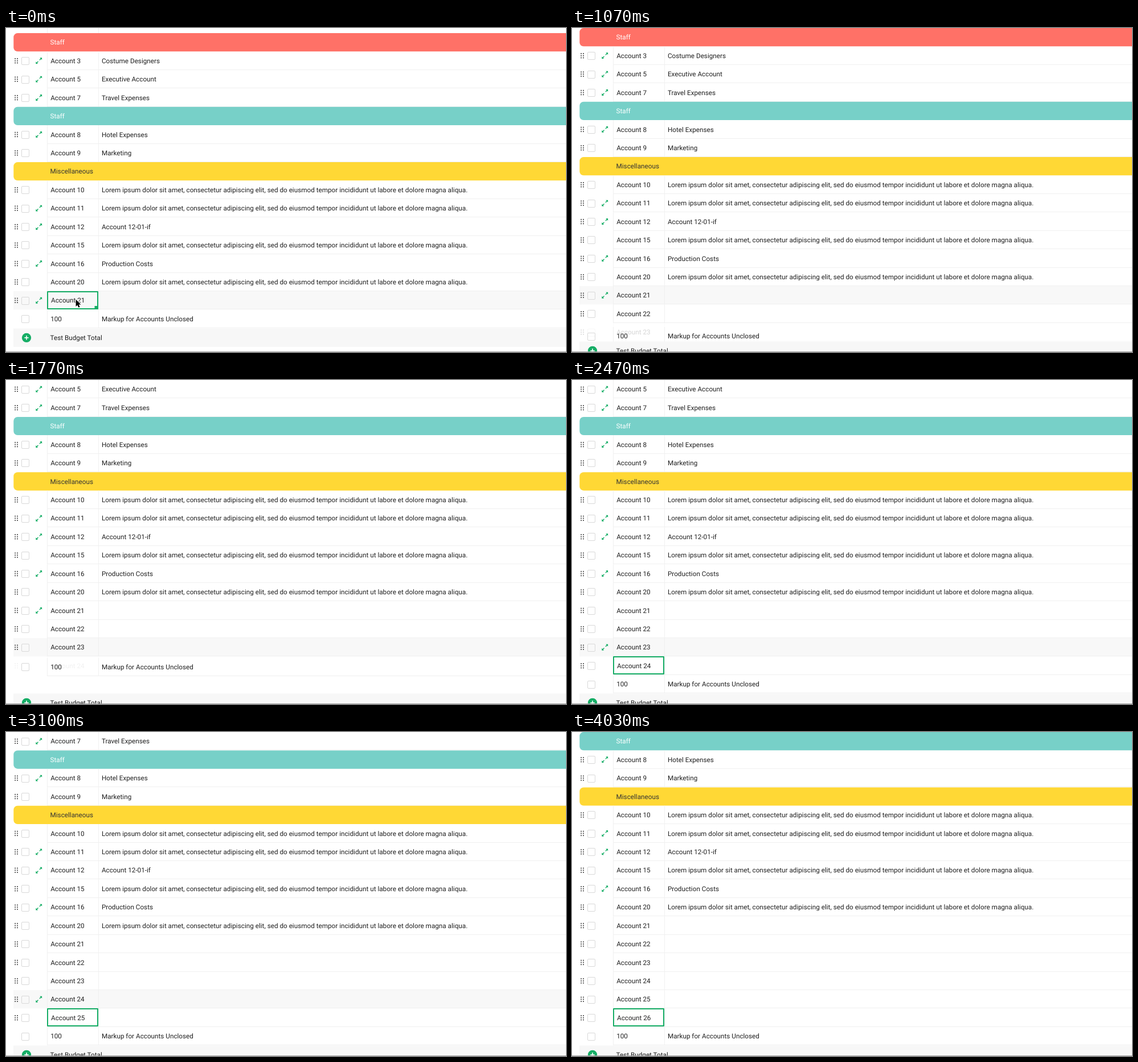
These frames come from a looping animation (983 px wide and 570 px high, 4570 ms). An HTML page with a canvas:

```html
<!DOCTYPE html>
<html lang="en">
<head>
<meta charset="utf-8">
<title>Budget table</title>
<style>
html, body { margin: 0; width: 100%; height: 100%; overflow: hidden; background: #fff; }
canvas { display: block; }
</style>
</head>
<body>
<canvas id="stage" width="983" height="570"></canvas>
<script>
const ctx = document.getElementById('stage').getContext('2d');
const W = 983, H = 570, LOOP = 4570, ROW = 32.43;
const GREEN = '#15ad65', LINE = '#f0f0f0', HOVER = '#f8f8f8', INK = '#212121';
const LOREM = 'Lorem ipsum dolor sit amet, consectetur adipiscing elit, sed do eiusmod tempor incididunt ut labore et dolore magna aliqua.';

const group = (title, fill, ink) => ({ title, fill, ink });
const account = (id, note = '', expands = false) => ({ label: 'Account ' + id, note, expands });
const ROWS = [
  group('Staff', '#ff7167', '#fff'),
  account(3, 'Costume Designers', true),
  account(5, 'Executive Account', true),
  account(7, 'Travel Expenses', true),
  group('Staff', '#77d0c8', '#fff'),
  account(8, 'Hotel Expenses', true),
  account(9, 'Marketing'),
  group('Miscellaneous', '#ffd835', '#333'),
  account(10, LOREM),
  account(11, LOREM, true),
  account(12, 'Account 12-01-if', true),
  account(15, LOREM),
  account(16, 'Production Costs', true),
  account(20, LOREM)
];
for (let id = 21; id <= 26; id++) ROWS.push(account(id));
const LAST = 14; // index of the last account before any insertion

// Per insertion count: when it starts, scroll position, hovered row
const STARTS = [-1000, 270, 1005, 1740, 2495, 3270];
const TOPS = [9, 9, 0, -2 * ROW, -3 * ROW, -4 * ROW];
const HOVERS = [14, 14, 14, 16, 17, -1];
const SLIDE = 400, FADE = 200, HOVER_LAG = 20, ICON_LAG = 30, SELECT_LAG = 330;

const clamp = v => Math.max(0, Math.min(1, v));

// CSS "ease": cubic-bezier(.25, .1, .25, 1)
function ease(x) {
  let lo = 0, hi = 1;
  for (let i = 0; i < 20; i++) {
    const t = (lo + hi) / 2;
    if (0.75 * t - 0.75 * t * t + t ** 3 < x) lo = t; else hi = t;
  }
  const t = hi, u = 1 - t;
  return 0.3 * u * u * t + 3 * u * t * t + t ** 3;
}

function rect(x, y, w, h, fill) {
  ctx.fillStyle = fill;
  ctx.fillRect(x, y, w, h);
}

function text(s, x, middle, fill = INK) {
  ctx.fillStyle = fill;
  ctx.fillText(s, x, middle + 4.2);
}

function path(points, close) {
  ctx.beginPath();
  points.forEach(([x, y]) => ctx.lineTo(x, y));
  if (close) ctx.closePath();
}

function drawHandle(y) {
  for (const x of [16.1, 20])
    for (const dy of [-3.7, 0, 3.7]) rect(x - 0.9, y + dy - 0.9, 1.9, 1.9, '#565656');
}

function drawCheckbox(y) {
  ctx.strokeStyle = '#d9d9d9';
  ctx.lineWidth = 1;
  ctx.beginPath();
  ctx.roundRect(27.5, Math.round(y - 6.5) + 0.5, 13, 13, 1.5);
  ctx.stroke();
}

function drawExpand(y, alpha) {
  if (alpha <= 0) return;
  ctx.save();
  ctx.globalAlpha *= alpha;
  ctx.translate(57.7, y);
  ctx.fillStyle = ctx.strokeStyle = GREEN;
  ctx.lineWidth = 1.4;
  for (let i = 0; i < 2; i++) {
    path([[1.2, -1.2], [4.3, -4.3]]);
    ctx.stroke();
    path([[1.6, -5.4], [5.4, -5.4], [5.4, -1.6]], true);
    ctx.fill();
    ctx.rotate(Math.PI);
  }
  ctx.restore();
}

function drawCellLines(y) {
  rect(72, y, 1, ROW, LINE);
  rect(162, y, 1, ROW, LINE);
  rect(72, Math.round(y + ROW) - 1, W, 1, LINE);
}

function drawGroup(row, y) {
  ctx.fillStyle = row.fill;
  ctx.beginPath();
  ctx.roundRect(13.3, y + 0.1, W, ROW - 0.3, 7);
  ctx.fill();
  text(row.title, 77.5, y + ROW / 2, row.ink);
}

function drawAccount(row, y, hovered, icon, selected) {
  const middle = y + ROW / 2;
  if (hovered) rect(13, y, W, ROW, HOVER);
  drawCellLines(y);
  drawHandle(middle);
  drawCheckbox(middle);
  drawExpand(middle, row.expands ? 1 : icon);
  text(row.label, selected ? 79 : 78.2, middle);
  text(row.note, 167.9, middle);
}

function drawSelection(y, withGrip) {
  const top = Math.round(y);
  ctx.strokeStyle = GREEN;
  ctx.lineWidth = 2;
  ctx.strokeRect(73, top + 1, 88, 30);
  if (withGrip) rect(155.5, top + 26, 6.5, 6, GREEN);
}

function drawMarkup(y) {
  const middle = y + ROW / 2;
  drawCellLines(y);
  drawCheckbox(middle);
  text('100', 78.2, middle);
  text('Markup for Accounts Unclosed', 167.9, middle);
}

function drawTotal(y) {
  const middle = y + 16.3;
  rect(13, y, W, 32.4, '#f7f7f7');
  ctx.fillStyle = GREEN;
  ctx.beginPath();
  ctx.arc(36, middle, 8.1, 0, 7);
  ctx.fill();
  rect(32.3, middle - 0.8, 7.4, 1.6, '#fff');
  rect(35.2, middle - 3.7, 1.6, 7.4, '#fff');
  text('Test Budget Total', 77.5, middle);
}

function drawPointer(x, y) {
  path([[0, 0], [0, 12.4], [2.8, 9.8], [4.8, 14.2], [7, 13.2], [5.1, 9], [8.9, 8.8]]
    .map(([dx, dy]) => [x + dx, y + dy]), true);
  ctx.lineJoin = 'round';
  ctx.strokeStyle = '#fff';
  ctx.lineWidth = 1.8;
  ctx.stroke();
  ctx.fillStyle = '#000';
  ctx.fill();
}

function draw(time) {
  const added = STARTS.filter(s => s <= time).length - 1;
  const age = time - STARTS[added];
  const top = TOPS[added], last = LAST + added;
  const oldHover = HOVERS[Math.max(0, added - 1)], newHover = HOVERS[added];
  const hover = age >= HOVER_LAG ? newHover : oldHover;
  const iconMix = clamp((age - ICON_LAG) / FADE);
  const selected = age >= SELECT_LAG;
  const yOf = index => top + index * ROW;

  rect(0, 0, W, H, '#fff');
  ctx.font = '11.72px Roboto, sans-serif';
  ctx.textRendering = 'geometricPrecision';

  if (top > 0) {
    rect(72, 0, 1, top, LINE);
    rect(162, 0, 1, top, LINE);
  }
  for (let i = 0; i <= last; i++) {
    const row = ROWS[i], y = yOf(i);
    if (y + ROW < 0) continue;
    if (row.fill) {
      drawGroup(row, y);
      continue;
    }
    const icon = (i === oldHover ? 1 - iconMix : 0) + (i === newHover ? iconMix : 0);
    ctx.globalAlpha = i === last ? clamp(age / FADE) ** 1.5 : 1;
    drawAccount(row, y, i === hover, icon, i === last && selected);
    ctx.globalAlpha = 1;
  }
  drawMarkup(yOf(last + ease(clamp(age / SLIDE))));
  if (selected) drawSelection(yOf(last), added === 0);

  drawTotal(added ? 551.5 : 528.6);
  rect(0, 569, W, 1, '#a6a6a6');
  if (!added) drawPointer(122.6, 477.6);
}

const origin = performance.now();
function tick() {
  draw((performance.now() - origin) % LOOP);
  requestAnimationFrame(tick);
}
tick();
</script>
</body>
</html>
```
